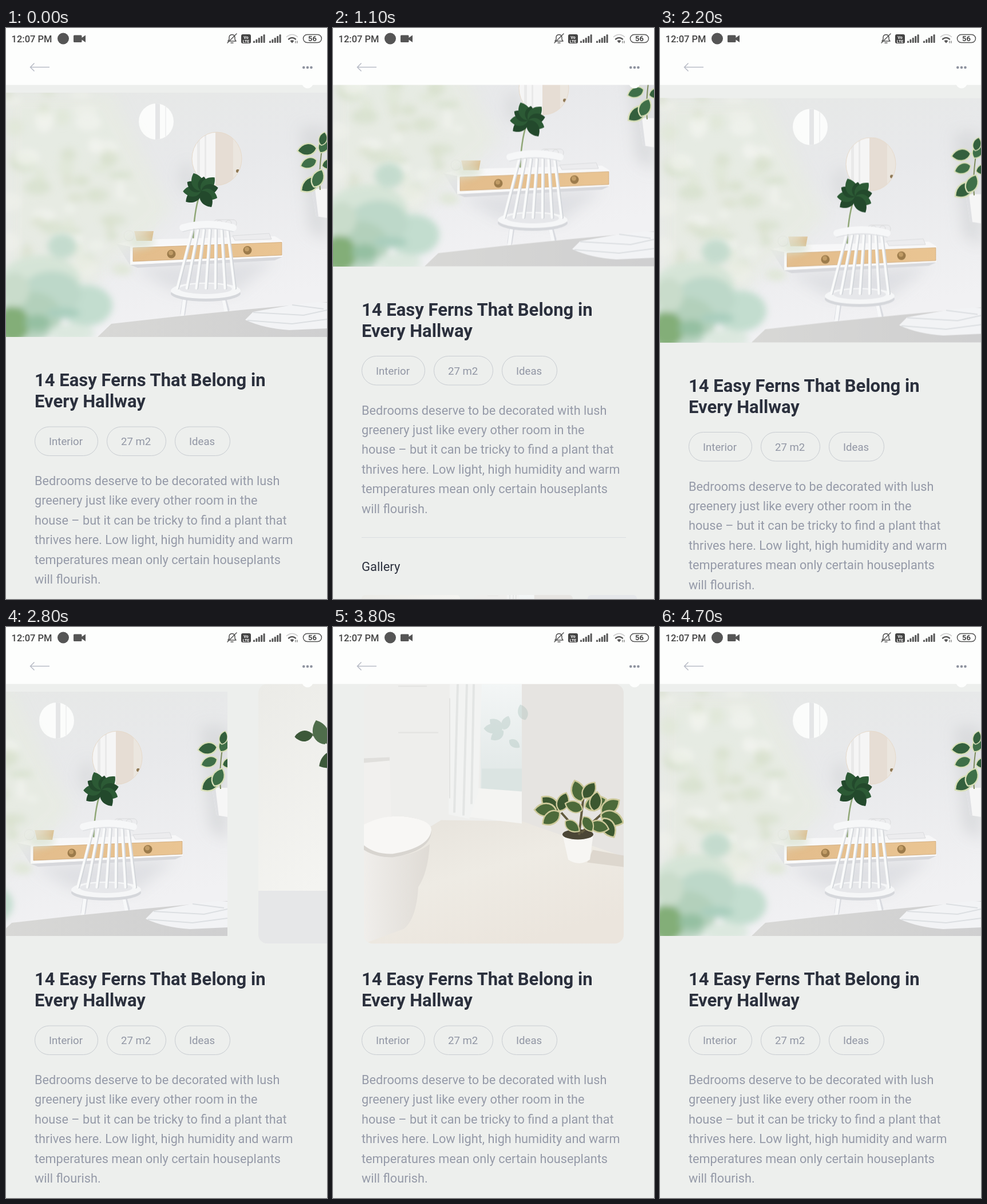
An HTML page for the animation above (4800 ms loop, 561 by 998 pixels).

```html
<!DOCTYPE html>
<html lang="en">
<head>
<meta charset="utf-8">
<title>Plant article</title>
<style>
html, body { margin: 0; width: 100%; height: 100%; overflow: hidden; background: #edefed; }
#stage { display: block; width: 100vw; height: 100vh; }
text { font-family: Roboto, "Liberation Sans", sans-serif; }
.title { font-size: 31px; font-weight: 700; fill: #2b303d; }
.chips rect { fill: none; stroke: #c8ccd1; }
.chips text { font-size: 18.6px; fill: #9196a4; }
.body text { font-size: 21.7px; fill: #959aa8; }
.label { font-size: 22px; fill: #2b303d; }
.status { fill: #555; }
.line { fill: none; stroke: #555; stroke-width: 1.5; stroke-linecap: round; stroke-linejoin: round; }
</style>
</head>
<body>
<svg id="stage" viewBox="0 0 561 998" xmlns="http://www.w3.org/2000/svg">
<defs>
  <filter id="soft" x="-40%" y="-40%" width="180%" height="180%"><feGaussianBlur stdDeviation="6"/></filter>
  <filter id="haze" x="-40%" y="-40%" width="180%" height="180%"><feGaussianBlur stdDeviation="12"/></filter>
  <linearGradient id="wall" x2=".3" y2="1">
    <stop stop-color="#e6e8e6"/><stop offset=".45" stop-color="#e8e9eb"/><stop offset="1" stop-color="#f1f1f3"/>
  </linearGradient>
  <linearGradient id="bed" x2="1"><stop stop-color="#d8d8d6"/><stop offset="1" stop-color="#cfcfd0"/></linearGradient>
  <linearGradient id="wood" x2="1"><stop stop-color="#e3bd8c"/><stop offset="1" stop-color="#eac593"/></linearGradient>
  <linearGradient id="studio" x2="1" y2="1"><stop stop-color="#ebebe7"/><stop offset=".5" stop-color="#f4f4f1"/><stop offset="1" stop-color="#eeeeeb"/></linearGradient>
  <linearGradient id="floor" x2=".6" y2="1"><stop stop-color="#e6e2db"/><stop offset=".5" stop-color="#eeebe4"/><stop offset="1" stop-color="#ebe5dd"/></linearGradient>
  <linearGradient id="pane" x2="0" y2="1"><stop stop-color="#f3f6f6"/><stop offset="1" stop-color="#dfe6e5"/></linearGradient>
  <linearGradient id="bowl" x2="1"><stop stop-color="#f0eeeb"/><stop offset="1" stop-color="#dfdbd5"/></linearGradient>
  <clipPath id="mirror"><ellipse cx="368.5" cy="115.5" rx="43.5" ry="46.5"/></clipPath>
  <clipPath id="window"><ellipse cx="262.5" cy="50.5" rx="30.5" ry="31.5"/></clipPath>
  <clipPath id="round172"><rect width="172" height="172" rx="6"/></clipPath>
  <clipPath id="round454"><rect width="454" height="454" rx="16"/></clipPath>

  <symbol id="room" viewBox="0 0 561 427">
    <rect width="561" height="427" fill="url(#wall)"/>
    <g filter="url(#haze)">
      <path d="M515 60L561 60V260L530 240Z" fill="#d6d7da" opacity=".8"/>
      <path d="M225 305L470 292L400 350L290 345Z" fill="#dbdce0" opacity=".8"/>
      <ellipse cx="316" cy="150" rx="14" ry="28" fill="#d6d8d9" opacity=".7"/>
    </g>
    <g clip-path="url(#window)">
      <rect x="230" y="15" width="66" height="70" fill="#fbfcfb"/>
      <path d="M261 15h8v70h-8z" fill="#e5e6e7"/>
      <path d="M278 15h2v70h-2z" fill="#f0f1f1"/>
    </g>
    <g clip-path="url(#mirror)">
      <rect x="320" y="65" width="95" height="100" fill="#f5f5f5"/>
      <path d="M334 65h5v100h-5zM347 65h3v100h-3z" fill="#e9e9e9"/>
      <path d="M366 65h31v100h-31z" fill="#e6ddd4"/>
      <path d="M397 65h18v100h-18z" fill="#ebe6df"/>
      <circle cx="405" cy="137" r="3" fill="#8d7754"/>
    </g>
    <ellipse cx="368.5" cy="115.5" rx="43.5" ry="46.5" fill="none" stroke="#e5d8c8"/>
    <path d="M338 180C331 200 328 225 327 258" fill="none" stroke="#8fa676" stroke-width="2.5"/>
    <g id="fan"></g>
    <path d="M534 168H561V219L542 216Z" fill="#f6f6f6"/>
    <path d="M534 168L542 216L546 217L540 168Z" fill="#dfe0e3"/>
    <path d="M549 170C546 140 551 100 556 80" fill="none" stroke="#7c8b5b" stroke-width="2"/>
    <g id="potted"></g>
    <path d="M193 264L217 302L217 269Z" fill="#e2e3e6"/>
    <path d="M193 264L217 269L483 259L470 251L230 257Z" fill="#f7f7f8"/>
    <path d="M217 268L483 259V287L217 301Z" fill="#fafafa"/>
    <path d="M222 271L482 261.5V284L222 295Z" fill="url(#wood)" stroke="#c6a071" stroke-width=".7"/>
    <path d="M217 301L483 287L470 293L230 306Z" fill="#d7d8dc"/>
    <path d="M396 250L460 246L464 256L400 258Z" fill="#ececee" stroke="#dadbdd"/>
    <g fill="none" stroke="#d9dadb"><rect x="363" y="222" width="40" height="13" rx="6"/><circle cx="373" cy="228" r="5"/><circle cx="389" cy="228" r="5"/></g>
    <path d="M224 242H258L255 259H228Z" fill="#d9b680"/>
    <circle cx="215" cy="250" r="9" fill="none" stroke="#cfd0cf"/>
    <rect x="222" y="185" width="40" height="57" rx="10" fill="#eaecea" opacity=".75"/>
    <g fill="#9c7b4b"><circle cx="289" cy="282" r="7.5"/><circle cx="422" cy="275.5" r="7.5"/></g>
    <g fill="#c19c66"><circle cx="288" cy="280" r="4"/><circle cx="421" cy="273.5" r="4"/></g>
    <g id="chair" stroke-linecap="round"></g>
    <path d="M160 427L184 404L300 391L420 379L561 366V427Z" fill="url(#bed)"/>
    <path d="M418 397L432 383L500 371L545 366L561 367V412L495 415Q450 412 418 397Z" fill="#f2f3f5"/>
    <path d="M432 384L520 389L561 380M422 398L500 404L561 396M500 371L555 378" fill="none" stroke="#dcdfe2" stroke-width="2"/>
    <path d="M0 0H185Q245 120 290 205Q240 260 190 290L150 340L0 340Z" fill="#e7ebe2" opacity=".8" filter="url(#haze)"/>
    <g id="blossom" filter="url(#soft)"></g>
    <g id="shrub" filter="url(#soft)"></g>
  </symbol>

  <symbol id="vase" viewBox="0 0 172 172"><g clip-path="url(#round172)">
    <rect width="172" height="172" fill="url(#studio)"/>
    <path d="M0 137H172V172H0Z" fill="#e6e7e8"/>
    <path d="M125 155L172 150V162L120 165Z" fill="#d9dbdc"/>
    <path d="M104 98H122L125 108V160Q125 165 120 165H105Q100 165 100 160V108Z" fill="#e5e8e6" stroke="#c7cbc8"/>
    <path d="M101 132H124V160Q124 164 119 164H106Q101 164 101 160Z" fill="#d5dad6"/>
    <path d="M120 138C108 110 96 80 72 57Q52 42 33 32" fill="none" stroke="#65765a" stroke-width="1.3"/>
    <g id="sprig"></g>
  </g></symbol>

  <symbol id="bath" viewBox="0 0 454 454"><g clip-path="url(#round454)">
    <rect width="454" height="454" fill="#eeeeec"/>
    <path d="M276 0H454V310L276 242Z" fill="#e6e4e1"/>
    <path d="M0 320L135 238L276 240L454 302V454H0Z" fill="url(#floor)"/>
    <path d="M204 0H276V190H204Z" fill="url(#pane)"/>
    <path d="M206 148H276V188H206Z" fill="#dbe4e2"/>
    <path d="M196 182L276 188V244L180 232Z" fill="#f4f4f2"/>
    <path d="M150 0H206L200 190L184 236L148 228Z" fill="#f2f3f2"/>
    <path d="M164 0L158 225M180 0L174 230M192 0L188 210" stroke="#e3e5e4" stroke-width="4"/>
    <path d="M60 4H110M60 85H130M150 25V200" stroke="#e3e3e1" stroke-width="2"/>
    <g id="view" opacity=".35"></g>
    <path d="M0 130L45 128L48 240L0 250Z" fill="#f1f0ee"/>
    <path d="M0 130L45 128V134L0 138Z" fill="#e0dfdc"/>
    <path d="M0 280Q60 320 115 280Q112 330 95 355Q92 410 70 428L0 454Z" fill="url(#bowl)"/>
    <path d="M0 250Q30 230 65 231Q117 236 118 257Q117 292 50 303Q20 303 0 290Z" fill="#d8d5d0"/>
    <path d="M0 246Q30 230 65 231Q117 236 118 255Q115 286 50 297Q20 298 0 282Z" fill="#f8f7f5"/>
    <path d="M400 290L454 300V320L390 312Z" fill="#d8d0c6" opacity=".7"/>
    <path d="M347 262H401L395 307Q376 320 357 307Z" fill="#f7f6f3"/>
    <ellipse cx="374" cy="263" rx="27" ry="9" fill="#4b4636"/>
    <path d="M376 264L384 195M378 262L345 225M380 260L418 225" stroke="#625b40" stroke-width="4" fill="none"/>
    <g id="bush"></g>
  </g></symbol>
</defs>

<rect width="561" height="998" fill="#edefed"/>
<g id="content">
  <g id="pages">
    <use href="#room" y="113" width="561" height="427"/>
    <use href="#vase" x="615" y="99.5" width="454" height="454"/>
    <use href="#bath" x="1176" y="99.5" width="454" height="454"/>
  </g>
  <text class="title" x="50" y="626">14 Easy Ferns That Belong in</text>
  <text class="title" x="50" y="663">Every Hallway</text>
  <g class="chips">
    <rect x="50.5" y="697" width="110" height="50.5" rx="25.2"/><text x="75" y="729">Interior</text>
    <rect x="176.500" y="697" width="103" height="50.5" rx="25.2"/><text x="201" y="729">27 m2</text>
    <rect x="295.5" y="697" width="96" height="50.5" rx="25.2"/><text x="320" y="729">Ideas</text>
  </g>
  <g class="body" id="body"></g>
  <path d="M50 1014H512" stroke="#d9dde0"/>
  <text class="label" x="50" y="1072.500">Gallery</text>
  <use href="#vase" x="50" y="1114.500" width="172" height="172"/>
  <use href="#bath" x="247" y="1114.500" width="172" height="172"/>
  <rect x="445" y="1114.500" width="86" height="86" rx="6" fill="#e5e7ea"/>
  <text x="487" y="1166" text-anchor="middle" font-size="22" fill="#9a9fac">+2</text>
</g>

<rect width="561" height="99.5" fill="#fdfefd"/>
<circle cx="527" cy="95.500" r="10" fill="#fdfefd"/>
<path d="M76 68.500H43M49.500 61.500L42.500 68.500L49.500 75.500" fill="none" stroke="#b8bcc6" stroke-width="1.5"/>
<g fill="#8e939f"><circle cx="520.300" cy="69" r="2.300"/><circle cx="527" cy="69" r="2.300"/><circle cx="533.500" cy="69" r="2.300"/></g>

<g class="status">
  <text x="9.500" y="25" font-size="16.500" font-weight="500" fill="#444">12:07 PM</text>
  <circle cx="100" cy="18.500" r="10"/>
  <path d="M119.500 12.500H131Q132.500 12.500 132.500 14V17L139 12.500V25L132.500 20.500V23.500Q132.500 25 131 25H119.500Q118 25 118 23.500V14Q118 12.500 119.500 12.500Z"/>
  <path class="line" d="M388 23H402L400 20V16Q399.500 12 395 11.500Q390.500 12 390 16V20ZM393 26H397M387 26L403 10"/>
  <rect x="411" y="11" width="17" height="16" rx="3" fill="#444"/>
  <g fill="#fff" font-size="7" font-weight="700" text-anchor="middle"><text x="419.500" y="18.500">Vo</text><text x="419.500" y="25.500">LTE</text></g>
  <g id="bars"></g>
  <path class="line" d="M490.500 15.500Q500 7.500 509.500 15.500" stroke-width="2" style="stroke:#c9c9c9"/>
  <path class="line" d="M494 19.500Q500 14.500 506 19.500" style="stroke-width:2.400"/>
  <path d="M496.500 22.500Q500 20 503.500 22.500L500 26.500Z"/>
  <path d="M506 22.500v4M509 22.500v4" stroke="#555"/>
  <rect class="line" x="519.500" y="11.500" width="32" height="14" rx="7"/>
  <text x="535.500" y="23.200" font-size="13" font-weight="700" text-anchor="middle" fill="#444">56</text>
</g>
</svg>

<script>
const $ = id => document.getElementById(id);
const fill = (id, parts) => { $(id).innerHTML = parts.join(''); };

const leaf = ([x, y, len, deg], color, rim = 'none') =>
  `<path d="M0 0C.2-.4.7-.4 1 0C.7.4.2.4 0 0" transform="translate(${x} ${y}) rotate(${deg}) scale(${len})" fill="${color}" stroke="${rim}" stroke-width=".07"/>`;
const blob = (x, y, rx, ry, color, opacity = 1) =>
  `<ellipse cx="${x}" cy="${y}" rx="${rx}" ry="${ry}" fill="${color}" opacity="${opacity}"/>`;
const range = n => [...Array(n).keys()];

let seed = 11;
const rnd = () => (seed = (seed * 16807) % 2147483647) / 2147483647;

// Photo parts
fill('fan', range(9).map(i =>
  leaf([341, 172, 25 + 9 * Math.abs(Math.sin(i * 1.3 + 1)), -215 + i * 34], i % 2 ? '#2c5a35' : '#23492c')));

fill('potted', [
  [543, 97, 34, 172], [543, 118, 30, 160], [547, 150, 38, 145], [549, 105, 30, -62],
  [552, 128, 30, -15], [538, 165, 34, -65], [551, 92, 24, -75]
].map((l, i) => leaf(l, i % 2 ? '#3f6f48' : '#34603d', '#d8dfb8')));

const spindle = (i, color, dx) =>
  `<path d="M${325 + i * 10.3 + dx} 240L${299 + i * 16.7 + dx} 342" stroke="${color}" stroke-width="4"/>`;
fill('chair', [
  '<path d="M313 360L309 386M380 358L386 380" stroke="#d9dbe0" stroke-width="9"/>',
  '<path d="M312 360L308 390M379 358L385 384" stroke="#f7f8f9" stroke-width="6"/>',
  blob(349, 351, 61, 14, '#d5d7db'), blob(349, 346, 61, 14, '#f5f6f7'),
  blob(349, 343, 46, 9, '#e6e7ea'),
  ...range(7).map(i => spindle(i, '#d3d6da', 2) + spindle(i, '#f9fafa', 0)),
  '<path d="M309 236Q352 224 397 236" stroke="#f6f7f8" stroke-width="12" fill="none"/>',
  '<path d="M309 243Q352 232 397 243" stroke="#dfe1e4" stroke-width="1.500" fill="none"/>'
]);

const pale = ['#d8e0cd', '#f3f4f0', '#dfe6d6', '#f0f2ec', '#d5dfca'];
fill('blossom', range(60).map(i => {
  const y = rnd() * 310, x = rnd() * (165 + y * .3);
  return blob(x, y, 7 + rnd() * 17, 6 + rnd() * 13, pale[i % 5], .65);
}));
fill('shrub', [
  blob(60, 330, 70, 45, '#d5e4d7'), blob(98, 268, 25, 22, '#c4dbce'),
  blob(140, 372, 46, 36, '#c3ddcf'), blob(80, 350, 52, 38, '#bdd8c9'),
  blob(45, 390, 52, 42, '#b3d0bb'), blob(12, 405, 28, 32, '#83ae78'),
  blob(55, 402, 22, 14, '#95c0a2'), blob(100, 385, 30, 9, '#a9cebd'),
  blob(15, 345, 26, 30, '#c9dccb'), blob(115, 420, 40, 16, '#dce8df')
]);

fill('sprig', [
  [36, 34, 12, 175], [44, 40, 17, -110], [55, 46, 17, 150], [66, 52, 18, -80],
  [75, 62, 16, -40], [80, 68, 16, 165], [84, 74, 17, -25], [89, 83, 18, -20],
  [94, 84, 17, 165], [98, 93, 14, 25], [104, 105, 16, -40], [113, 122, 15, 80], [115, 125, 14, 150]
].map((l, i) => leaf(l, i % 2 ? '#4f6d4b' : '#3c5839')));

const plant = [
  [340, 222, 38, -140], [336, 220, 38, 180], [342, 224, 36, 145], [342, 222, 34, -70],
  [352, 240, 30, 35], [380, 205, 38, -108], [384, 200, 34, -55], [386, 215, 40, -20],
  [382, 220, 32, -160], [402, 222, 34, -80], [415, 225, 38, -35], [414, 228, 42, 20],
  [418, 235, 38, 60], [395, 245, 34, 15], [384, 232, 30, 60]
];
const shrubbery = plant.map((l, i) => leaf(l, i % 3 ? '#4c6a3a' : '#3b5730', '#cdc99a'));
fill('bush', shrubbery);
fill('view', plant.slice(0, 6).map(([x, y, n, a]) => leaf([x - 98, y - 142, n * .75, a], '#a5bfb8')));

// Interface parts
fill('bars', [432, 460].flatMap(x => range(5).map(i =>
  `<rect x="${x + i * 4.4}" y="${22.5 - i * 2.8}" width="3" height="${3.5 + i * 2.8}" rx="1"/>`)));
fill('body', [
  'Bedrooms deserve to be decorated with lush', 'greenery just like every other room in the',
  'house – but it can be tricky to find a plant that', 'thrives here. Low light, high humidity and warm',
  'temperatures mean only certain houseplants', 'will flourish.'
].map((line, i) => `<text x="50" y="${799 + i * 34.4}">${line}</text>`));

// Motion: [time, value, easing into this point]
const LOOP = 4800, STEP = 100;
const linear = p => p;
const out = p => 1 - (1 - p) ** 2.2;
const inOut = p => p * p * (3 - 2 * p);
const scrollY = [[1000, 0], [1100, -123.5], [1600, -362, out], [1900, -362], [2200, 9.5, inOut], [2400, 9.5], [2600, 0, inOut]];
const slideX = [[2600, 0], [2700, -60], [2800, -174], [3200, -561, out], [3300, -561], [3400, -735],
  [3800, -1122, out], [3900, -1122], [4000, -948], [4300, -561, out], [4400, -387], [4700, 0, out]];

function at(track, t) {
  const i = track.findIndex(k => k[0] > t);
  if (i === 0) return track[0][1];
  if (i < 0) return track[track.length - 1][1];
  const [t0, a] = track[i - 1], [t1, b, ease = linear] = track[i];
  return a + (b - a) * ease((t - t0) / (t1 - t0));
}

const start = performance.now();
function draw() {
  const now = (performance.now() - start) % LOOP;
  const t = Math.floor(now / STEP) * STEP;
  $('content').setAttribute('transform', `translate(0 ${at(scrollY, t)})`);
  $('pages').setAttribute('transform', `translate(${at(slideX, t)} 0)`);
  requestAnimationFrame(draw);
}
draw();
</script>
</body>
</html>
```
